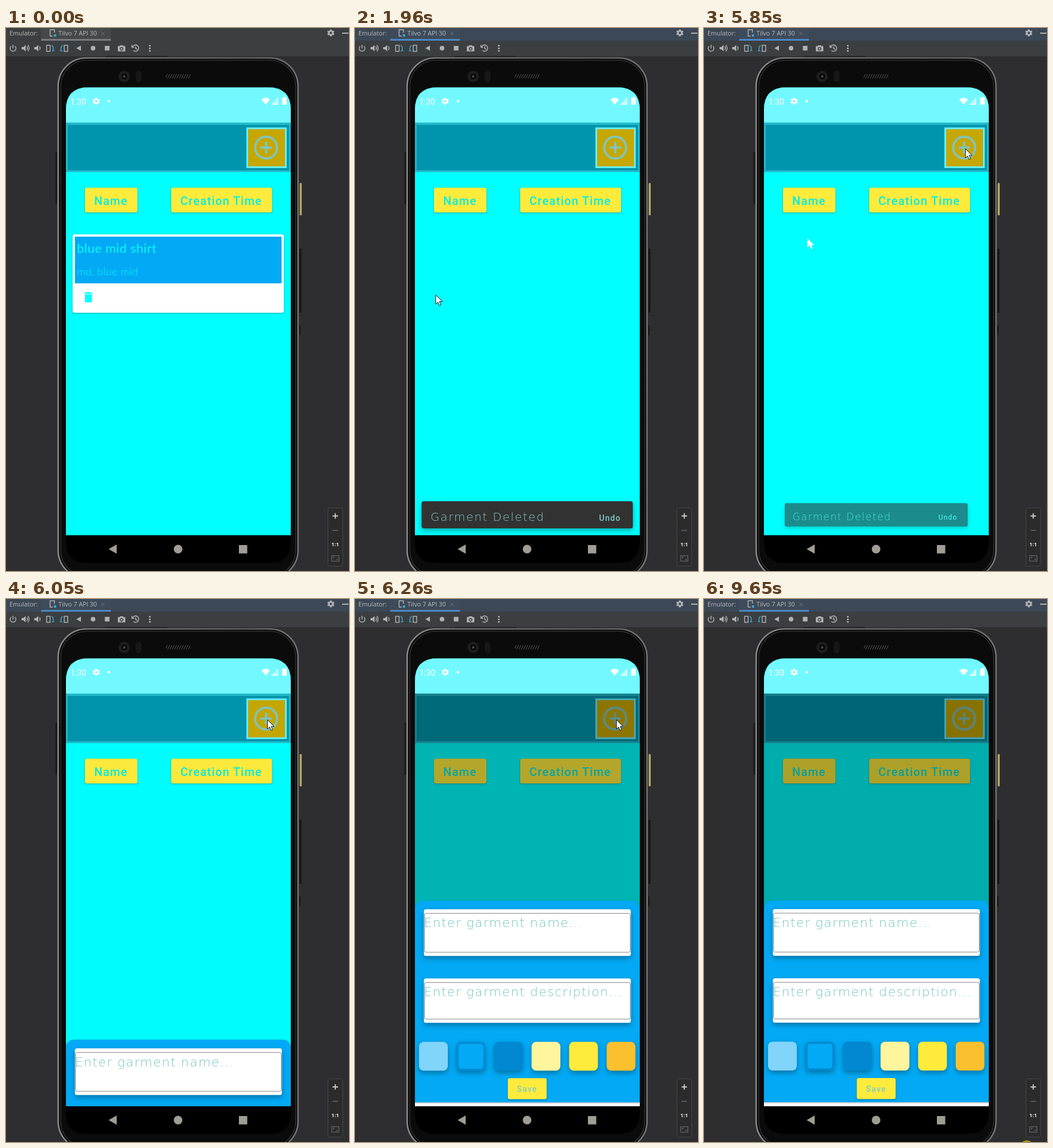
An HTML page that plays this animation: 595 by 942 pixels, repeating every 9720 ms.

```html
<!DOCTYPE html>
<html lang="en">
<head>
<meta charset="utf-8">
<title>Garment list</title>
<style>
html, body { margin: 0; width: 100%; height: 100%; overflow: hidden; background: #2e2e30; }
svg { display: block; width: 100vw; height: 100vh; }
text { white-space: pre; }
.ui { font: 10.8px "Open Sans", "Noto Sans", sans-serif; fill: #bbbcbd; }
.btn { font: 500 20px Roboto, sans-serif; letter-spacing: 1.25px; fill: #00ecec; }
.small { font: 500 14px Roboto, sans-serif; letter-spacing: 1.25px; fill: #80cbc4; }
.wide { font: 200 22px "DejaVu Sans", sans-serif; letter-spacing: 1.3px; fill: #72c4bc; }
.hand { font-family: Lato, sans-serif; fill: #00ffff; }
.low { filter: drop-shadow(0 1.5px 1.5px rgba(0,0,0,.32)); }
.high { filter: drop-shadow(0 4px 4px rgba(0,0,0,.32)); }
.line { fill: none; stroke: #afb1b3; stroke-width: 1.5; }
.icon { fill: #afb1b3; }
.blue { fill: none; stroke: #38a5cf; stroke-width: 1.5; }
</style>
</head>
<body>
<svg viewBox="0 0 595 942" preserveAspectRatio="none">
  <defs>
    <clipPath id="screen"><path d="M104 880V142Q104 103 143 103H455Q494 103 494 142V880Z"/></clipPath>
    <linearGradient id="rim" x2="1" y2="0">
      <stop offset="0" stop-color="#8d8d8d"/><stop offset=".2" stop-color="#737373"/>
      <stop offset=".8" stop-color="#606060"/><stop offset="1" stop-color="#777"/>
    </linearGradient>
    <pattern id="mesh" width="4" height="8" patternUnits="userSpaceOnUse">
      <path d="M0 8L4 0M-2 4L2 -4M2 12L6 4" stroke="#555" stroke-width="1"/>
    </pattern>
    <path id="gear" fill-rule="evenodd" d="M-1.4-6H1.4L1.8-4.2 3.2-3.4 4.9-4 6.2-1.7 4.8-.6V.6L6.2 1.7 4.9 4 3.2 3.4 1.8 4.2 1.4 6H-1.4L-1.8 4.2-3.2 3.4-4.9 4-6.2 1.7-4.8.6V-.6L-6.2-1.7-4.9-4-3.2-3.4-1.8-4.2ZM0-2A2 2 0 1 0 0 2 2 2 0 1 0 0-2Z"/>
    <path id="arrow" d="M0 0V16L3.8 12.6 6.4 18.5 9 17.4 6.5 11.6H11.5Z"/>
  </defs>

  <!-- window header and toolbar -->
  <rect width="595" height="942" fill="#2e2e30"/>
  <rect id="header" width="595" height="22"/>
  <rect id="tab" x="61" width="121" height="22"/>
  <rect id="underline" x="61" y="19" width="121" height="3"/>
  <rect y="22" width="595" height="27" fill="#3c3f41"/>
  <text class="ui" x="6" y="13">Emulator:</text>
  <text class="ui" x="91" y="13">Tilvo 7 API 30</text>
  <path class="line" stroke-width="1.2" d="M81 14H76.500V3H84V8"/>
  <path d="M83 11H87V15H83Z" fill="#38a5cf"/>
  <path d="M165 6.500L171 12.500M171 6.500L165 12.500" stroke="#74787a"/>
  <use href="#gear" class="icon" x="563.500" y="8.500"/>
  <path class="icon" d="M583 8H594V10H583Z"/>
  <g>
    <path class="line" d="M9 31.500A5 5 0 1 0 15.500 31.500M12.200 29V35.500"/>
    <path class="icon" d="M27 33H30L34 29.500V40.500L30 37H27ZM49 33H52L56 29.500V40.500L52 37H49Z"/>
    <path class="line" d="M36 32Q38.500 35 36 38M38 29.500Q42 35 38 40.500M58 32Q60.500 35 58 38"/>
    <path class="line" d="M70.500 30H76.500V40.500H70.500ZM101 30H107V40.500H101Z"/>
    <path class="blue" d="M79 30Q83 32 82 38M80 40.500L82 38 83.500 40M98.500 30Q94.500 32 95.500 38M97.500 40.500L95.500 38 94 40"/>
    <path class="icon" d="M122 35L130 30.500V39.500ZM171.500 31H179.500V39H171.500Z"/>
    <circle class="icon" cx="151" cy="35" r="4"/>
    <path class="icon" fill-rule="evenodd" d="M194 31.500H197L198 30H203L204 31.500H207V40.500H194ZM200.500 33A3 3 0 1 0 200.500 39 3 3 0 1 0 200.500 33Z"/>
    <circle class="icon" cx="200.500" cy="36" r="1.600"/>
    <path class="line" d="M219.500 33A5.500 5.500 0 1 1 221 39M218.500 29.500V33.500H222.500M225 32V35.500L227.500 37"/>
    <path class="icon" d="M248 29.500H251V32H248ZM248 34H251V36.500H248ZM248 38.500H251V41H248Z"/>
  </g>

  <!-- phone body -->
  <path d="M173 48.500H280V51H173Z" fill="#232324"/>
  <path d="M85.500 215H89V305H85.500Z" fill="#1c1c1d"/>
  <path d="M509 383H512.500V494H509ZM509 516H511V533H509Z" fill="#161617"/>
  <rect x="509.500" y="269" width="3.500" height="56" rx="1" fill="#b3a965"/>
  <rect x="90.500" y="52" width="416" height="903" rx="49" fill="#080808" stroke="url(#rim)" stroke-width="2.500"/>
  <rect x="95" y="56" width="407.500" height="895" rx="45" fill="#0b0b0b" stroke="#303030" stroke-width="1.500"/>
  <circle cx="205" cy="84" r="10" fill="#1d1d1e"/>
  <circle cx="205" cy="84" r="6" fill="#080808" stroke="#2b2b2b"/>
  <circle cx="205" cy="84" r="2.200" fill="#454545"/>
  <rect x="225" y="74" width="10" height="20" rx="5" fill="#171718"/>
  <rect x="277" y="80" width="44" height="7.500" rx="3.500" fill="url(#mesh)"/>
  <path d="M104 880H494V892Q494 928 458 928H140Q104 928 104 892Z" fill="#000"/>
  <path d="M178 904L192 896V912ZM404 897H418.500V911.500H404Z" fill="#9f9d94"/>
  <circle cx="298.500" cy="904" r="7.500" fill="#9f9d94"/>

  <!-- app -->
  <g clip-path="url(#screen)">
    <rect x="104" y="103" width="390" height="777" fill="#00ffff"/>
    <rect x="104" y="103" width="390" height="61" fill="#72f9ff"/>
    <text x="112" y="132.500" fill="#fff" style="font:14px Roboto,sans-serif">1:30</text>
    <use href="#gear" x="156.500" y="127" fill="#fff"/>
    <circle cx="178.500" cy="127" r="2.200" fill="#fff"/>
    <path fill="#fff" d="M443 124Q450.500 118 458 124L450.500 133ZM472 121V133H460ZM481 121H482V119.500H485V121H487V133H479V121Z"/>
    <path d="M463 130.500L470.500 123V131.500H463Z" fill="#72f9ff" opacity=".55"/>
    <rect x="104" y="164" width="390" height="86" fill="#22bbce"/>
    <rect x="107" y="168" width="384" height="79" fill="#0095ad"/>
    <rect x="418.500" y="174" width="67" height="67.500" fill="#c6a700" stroke="#65efff" stroke-width="3"/>
    <g fill="none" stroke="#80c4bd" stroke-width="4">
      <circle cx="451.300" cy="207.500" r="19"/>
      <path d="M441 207.500H461.600M451.300 197.200V217.800"/>
    </g>
    <rect class="low" x="137" y="277" width="91" height="43" rx="3.500" fill="#ffeb3b"/>
    <text class="btn" x="153" y="306.500">Name</text>
    <rect class="low" x="286.500" y="277" width="175" height="43" rx="3.500" fill="#ffeb3b"/>
    <text class="btn" x="302.500" y="306.500">Creation Time</text>

    <g id="card">
      <rect class="low" x="115.500" y="358" width="366.500" height="136" rx="4" fill="#fff"/>
      <rect x="119.500" y="362" width="358.500" height="81" fill="#03a9f4"/>
      <text class="hand" x="123" y="390" style="font-size:22px;letter-spacing:.5px">blue mid shirt</text>
      <text class="hand" x="123" y="429" style="font-size:18.500px;font-weight:300;letter-spacing:.3px">md, blue mid</text>
      <path transform="translate(131 455)" fill="#00ffff" d="M6 19c0 1.100.9 2 2 2h8c1.100 0 2-.9 2-2V7H6zM19 4h-3.500l-1-1h-5l-1 1H5v2h14z"/>
    </g>

    <g id="snack">
      <rect class="high" x="115.500" y="821" width="366.500" height="47" rx="4" fill="#323232"/>
      <text class="wide" x="131" y="855" style="font-size:20px;letter-spacing:1.700px;fill:#80cbc4">Garment Deleted</text>
      <text class="small" x="423.500" y="854.500">Undo</text>
    </g>

    <use id="ghost" href="#arrow" x="179.500" y="365" fill="#fff"/>
    <rect id="scrim" x="104" y="164" width="390" height="716" fill="#000"/>
    <g id="sheet">
      <rect x="104" y="840" width="390" height="400" fill="#fff"/>
      <path class="low" d="M104 873V539Q104 523 120 523H478Q494 523 494 539V873Z" fill="#03a9f4"/>
      <g id="fields"></g>
      <g id="swatches"></g>
      <rect class="low" x="265" y="831" width="67.500" height="36.500" rx="3.500" fill="#ffeb3b"/>
      <text class="small" x="281" y="855">Save</text>
    </g>
  </g>

  <!-- zoom panel -->
  <rect x="558.500" y="832.500" width="25.500" height="101" rx="3" fill="#2b2b2c" stroke="#47484a"/>
  <path d="M566.500 846.500H576M571.200 841.700V851.300" stroke="#d0d0d0" stroke-width="1.800"/>
  <path d="M566.500 871.500H576" stroke="#66686a" stroke-width="1.500"/>
  <text x="571" y="899" text-anchor="middle" fill="#dedede" style="font:700 9.500px 'Open Sans',sans-serif">1:1</text>
  <rect x="565" y="915.500" width="12.500" height="9.500" fill="none" stroke="#6e7072"/>
  <path d="M567.500 920V918H570M573 922.500H575V920" fill="none" stroke="#6e7072"/>

  <circle id="spot" cx="560" cy="951" r="12" fill="#98920f"/>
  <use id="cursor" href="#arrow" fill="#fff" stroke="#111"/>
</svg>
<script>
const LOOP = 9720;
const $ = id => document.getElementById(id);
const clamp = x => Math.min(1, Math.max(0, x));
const show = (id, on) => $(id).setAttribute("visibility", on ? "visible" : "hidden");
const fill = (id, color) => $(id).setAttribute("fill", color);
const fade = (id, a) => $(id).setAttribute("opacity", a);

// Each move: first step, last step, step count, way points
const moves = [
  [390, 1210, 13, [[466, 630], [440, 470], [390, 350], [330, 331], [254, 362], [174, 412], [132, 455], [135, 460], [140, 463]]],
  [4430, 5050, 10, [[130, 434], [180, 365], [270, 300], [375, 232], [440, 212], [453.5, 209.5]]],
  [6330, 6540, 4, [[440, 235], [390, 395], [382, 640], [379, 788]]],
  [6680, 7290, 9, [[379, 780], [350, 735], [310, 690], [270, 640], [250, 610]]],
  [7690, 7970, 5, [[249, 640], [243, 705], [238, 755], [237, 769]]],
  [8900, 9250, 6, [[250, 785], [310, 830], [390, 880], [450, 910], [496, 935], [520, 960]]]
];

$("fields").innerHTML = [[538, 81, "name"], [658, 77, "description"]].map(([y, h, word]) => `
  <rect class="high" x="119.500" y="${y}" width="359" height="${h}" rx="3.500" fill="#fff"/>
  <rect x="120.500" y="${y + 7}" width="357" height="${h - 13.5}" rx="3" fill="none" stroke="#858585"/>
  <text class="wide" x="119.500" y="${y + 31}">Enter garment ${word}...</text>`).join("");

const colors = ["#81d4fa", "#03a9f4", "#0288d1", "#fff59d", "#ffeb3b", "#fbc02d"];
$("swatches").innerHTML = colors.map((c, i) => {
  const x = 111 + i * 65.1;
  const ring = i === 1
    ? `<rect x="${x + 1.7}" y="769.700" width="46.600" height="46.600" rx="6.500" fill="none" stroke="#0288d1" stroke-width="3.400"/>` : "";
  return `<rect class="high" x="${x}" y="768" width="50" height="50" rx="8" fill="${c}"/>${ring}`;
}).join("");

function cursorAt(t) {
  const move = moves.filter(m => t >= m[0]).pop();
  if (!move || t >= 9250) return null;
  const [start, end, steps, pts] = move;
  const k = Math.floor(clamp((t - start) / (end - start)) * (steps - 1) + 1e-6);
  const s = k / (steps - 1) * (pts.length - 1);
  const i = Math.min(Math.floor(s), pts.length - 2);
  return [0, 1].map(a => pts[i][a] + (pts[i + 1][a] - pts[i][a]) * (s - i));
}

function drawSnack(t) {
  let scale = 1, alpha = 1;
  if (t < 1960) {
    const u = clamp((t - 1810) / 150);
    scale = .8 + .2 * u;
    alpha = u;
  } else if (t >= 5850) {
    scale = .866;
    alpha = .56;
  }
  show("snack", t >= 1810 && t < 5920);
  fade("snack", alpha);
  $("snack").setAttribute("transform", `translate(298.7 844.5) scale(${scale}) translate(-298.7 -844.5)`);
}

function drawSheet(t) {
  const held = 6120 + Math.floor((t - 6120) / 70) * 70;
  const age = Math.max(0, held - 6020);
  const w = age * .0387;
  const left = age > 400 ? 0 : (1 + w) * Math.exp(-w);
  const u = clamp(age / 290);
  show("sheet", age > 0);
  $("sheet").setAttribute("transform", `translate(0 ${357 * left})`);
  fade("scrim", .32 * u * u * (3 - 2 * u));
}

function draw(t) {
  const active = t >= 1360;
  fill("header", active ? "#3c4856" : "#3c3f41");
  fill("tab", active ? "#3e4b5a" : "#45494b");
  fill("underline", active ? "#4a88c7" : "#797d80");
  fade("card", 1 - clamp((t - 1800) / 120));
  show("ghost", t >= 4640 && t < 6050);
  show("spot", t >= 9650);
  drawSnack(t);
  drawSheet(t);
  const p = cursorAt(t);
  show("cursor", p);
  if (p) $("cursor").setAttribute("transform", `translate(${p})`);
}

const began = performance.now();
function tick() {
  draw((performance.now() - began) % LOOP);
  requestAnimationFrame(tick);
}
tick();
</script>
</body>
</html>
```
